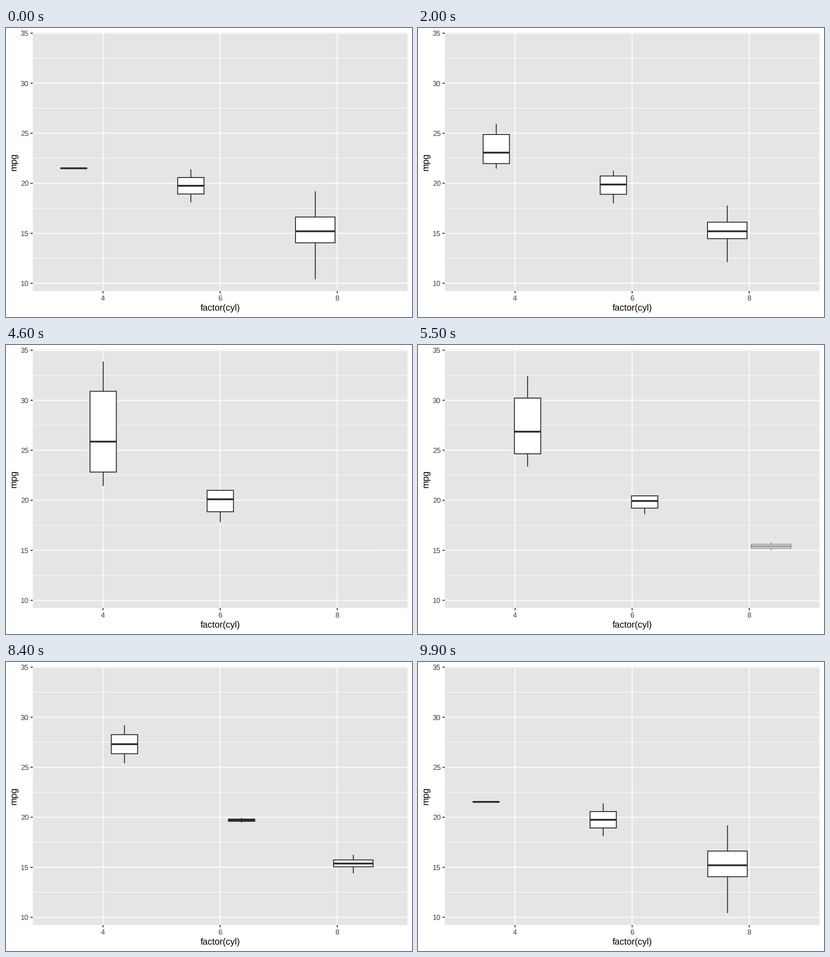
A matplotlib script that plays this animation: 885x632 px, repeating every 10 s.

```python
import math

import matplotlib.pyplot as plt
import numpy as np
from matplotlib.animation import FuncAnimation
from matplotlib.patches import Polygon, Rectangle

W, H, DPI = 885, 632, 100
FRAMES, INTERVAL = 100, 100
PT = 72 / DPI                      # points per pixel

PANEL, INK, LABEL = "#e5e5e5", "#282828", "#424242"
LINE, THIN, THICK = 1.93, 0.97, 3.85
LEFT, RIGHT, TOP, BOTTOM = 58.4, 875.1, 9.8, 575.25

plt.rcParams["font.family"] = "Liberation Sans"
plt.rcParams["text.hinting"] = "none"


def px(cat):
    """Category position (1, 2, 3) to pixels."""
    return 211.5 + (cat - 1) * 255.25


def py(value):
    """Data value to pixels."""
    return 558.3 - (value - 10) * 21.876


def five(values):
    return np.percentile(values, [0, 25, 50, 75, 100])


# One row per category: five-number summary for each of the three states.
STATS = [
    [five([21.5]),
     five([22.8, 24.4, 22.8, 32.4, 30.4, 33.9, 27.3, 21.4]),
     five([26.0, 30.4])],
    [five([21.4, 18.1]),
     five([21.0, 21.0, 19.2, 17.8]),
     five([19.7])],
    [five([18.7, 14.3, 16.4, 17.3, 15.2, 10.4,
           10.4, 14.7, 15.5, 15.2, 13.3, 19.2]),
     None,
     five([15.8, 15.0])],
]
DODGE = [[-0.25, 0, 0.25], [-0.25, 0, 0.25], [-0.1875, None, 0.1875]]
WIDTH = [0.225, 0.225, 0.3375]

# Last resting frame of a state, first resting frame of the next one.
MOVES = [(11, 33), (45, 67), (79, 100)]


def phase(frame):
    """State index and linear progress towards the next state."""
    for state, (start, end) in enumerate(MOVES):
        if frame <= start:
            return state, 0.0
        if frame < end:
            return state, (frame - start) / (end - start)
    return 0, 0.0


def pose(cat, frame):
    """Centre, summary and opacity of one box, or None if it is absent."""
    state, u = phase(frame)
    nxt = (state + 1) % 3
    t = (1 - math.cos(math.pi * u)) / 2
    a, b = STATS[cat][state], STATS[cat][nxt]
    da, db = DODGE[cat][state], DODGE[cat][nxt]
    alpha = 1.0
    if a is None:
        if u == 0:
            return None
        a, da = b, db                      # fade in on the spot
        alpha = t if u < 0.5 else 1.0
    elif b is None:
        b, db = np.full(5, a[2]), da       # shrink to the median
    return cat + 1 + da + (db - da) * t, a + (b - a) * t, alpha


fig = plt.figure(figsize=(W / DPI, H / DPI), dpi=DPI, facecolor="white")
ax = fig.add_axes([0, 0, 1, 1])
ax.set_xlim(0, W)
ax.set_ylim(H, 0)
ax.axis("off")


def line(xs, ys, width, color, z):
    return ax.plot(xs, ys, color=color, lw=width * PT, zorder=z, snap=False,
                   solid_capstyle="butt")[0]


def label(x, y, text, size, color, ha="center", **kw):
    ax.text(x, y, text, fontsize=size * PT, color=color, ha=ha,
            va="baseline", **kw)


def draw_axes():
    ax.add_patch(Rectangle((LEFT, TOP), RIGHT - LEFT, BOTTOM - TOP,
                           fc=PANEL, ec="none", snap=False, zorder=0))
    for v in np.arange(12.5, 35, 5):
        line([LEFT, RIGHT], [py(v)] * 2, THIN, "white", 1)
    for v in range(10, 36, 5):
        y = py(v)
        line([LEFT, RIGHT], [y, y], LINE, "white", 2)
        line([LEFT - 4.95, LEFT], [y, y], LINE, INK, 2)
        label(49.5, y + 5.7, str(v), 15.84, LABEL, ha="right")
    for cat, name in enumerate("468", 1):
        x = px(cat)
        line([x, x], [TOP, BOTTOM], LINE, "white", 2)
        line([x, x], [BOTTOM, BOTTOM + 4.95], LINE, INK, 2)
        label(x, 595.5, name, 15.84, LABEL)
    label(466.75, 618, "factor(cyl)", 19.8, "black")
    label(23, 292.5, "mpg", 19.8, "black", rotation=90,
          rotation_mode="anchor")


class Box:
    def __init__(self, cat):
        self.cat = cat
        self.whiskers = [line([], [], LINE, INK, 5) for _ in range(2)]
        self.body = Polygon(np.zeros((4, 2)), closed=True, fc="white", ec=INK,
                            lw=LINE * PT, joinstyle="miter", snap=False,
                            zorder=6)
        ax.add_patch(self.body)
        self.median = line([], [], THICK, INK, 7)
        self.parts = self.whiskers + [self.body, self.median]

    def update(self, frame):
        state = pose(self.cat, frame)
        for part in self.parts:
            part.set_visible(state is not None)
        if state is None:
            return
        centre, stats, alpha = state
        x, half = px(centre), WIDTH[self.cat] * 255.25 / 2
        low, q1, mid, q3, high = py(stats)
        q1 = max(q1, q3 + 0.02)            # keeps square corners when flat
        x0, x1 = x - half, x + half
        self.whiskers[0].set_data([x, x], [high, q3])
        self.whiskers[1].set_data([x, x], [q1, low])
        self.body.set_xy([(x0, q3), (x0, q1), (x1, q1), (x1, q3)])
        self.median.set_data([x0, x1], [mid, mid])
        for part in self.parts:
            part.set_alpha(alpha)


draw_axes()
boxes = [Box(cat) for cat in range(3)]


def update(frame):
    for box in boxes:
        box.update(frame)
    return [part for box in boxes for part in box.parts]


anim = FuncAnimation(fig, update, frames=FRAMES, interval=INTERVAL,
                     init_func=lambda: update(0), repeat=True,
                     repeat_delay=0, blit=False)
plt.show()
```
